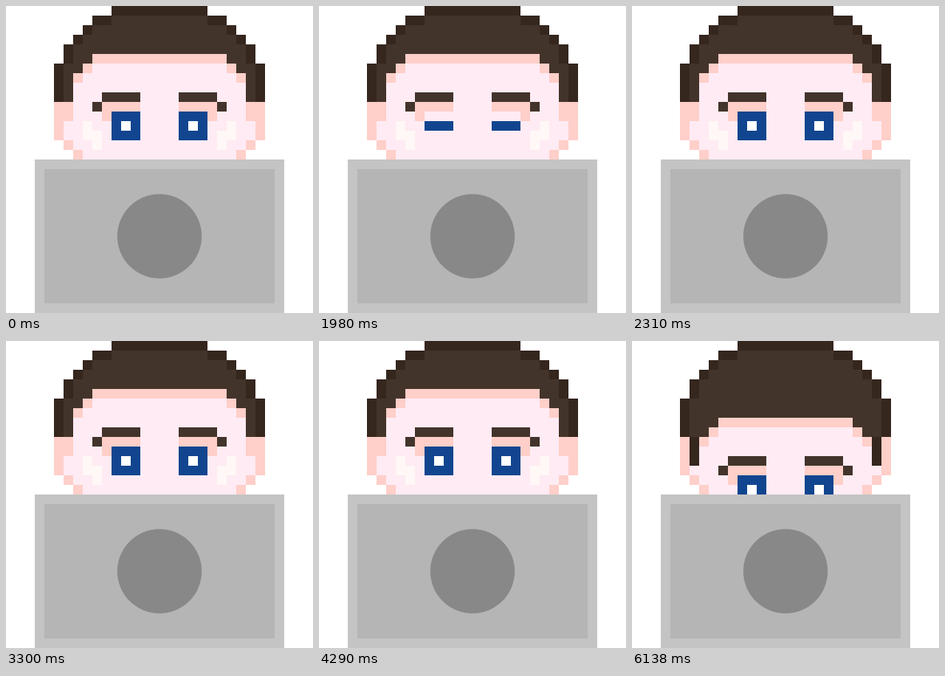
An HTML page that plays this animation: 384x384 px, repeating every 6930 ms.

```html
<!DOCTYPE html>
<html lang="en">
<head>
<meta charset="utf-8">
<title>Peeking over a laptop</title>
<style>
  html, body { margin: 0; width: 100%; height: 100%; overflow: hidden; background: #fff; }
  svg { display: block; width: 100vw; height: 100vh; }
  .mirror { transform: translateX(32px) scaleX(-1); }
  .outline { fill: #35261e; }
  .hair { fill: #43342b; }
  .skin { fill: #ffebf4; }
  .blush { fill: #ffcfc9; }
  .shine { fill: #fff8f6; }
  .iris { fill: #12458f; }

  /* one loop: look, blink twice, duck */
  .head, .open, .up, .down { animation: 6930ms step-end infinite; }
  .head { animation-name: duck; }
  .open { animation-name: blink; }
  .up { animation-name: up; }
  .down { animation-name: down; }
  @keyframes duck {
    0% { transform: none; }
    71.4286%, 100% { transform: translateY(3px); }
  }
  @keyframes blink {
    0%, 33.3333%, 47.619%, 100% { opacity: 1; }
    28.5714%, 42.8571% { opacity: 0; }
  }
  @keyframes up {
    0% { opacity: 1; }
    71.4286%, 100% { opacity: 0; }
  }
  @keyframes down {
    0% { opacity: 0; }
    71.4286%, 100% { opacity: 1; }
  }
</style>
</head>
<body>
<svg viewBox="0 0 32 32" shape-rendering="crispEdges">
  <defs>
    <!-- left halves on a 32-cell grid, mirrored for the right side -->
    <g id="hair">
      <path class="outline" d="M16 0H11V1H9V2H8V3H7V4H6V6H5V10H16z"/>
      <path class="hair" d="M16 1H11V2H9V3H8V4H7V6H6V10H16z"/>
    </g>
    <g id="face">
      <path class="blush" d="M16 5H9V6H8V7H7V9H16z"/>
      <path class="skin" d="M16 6H9V7H8V8H7V16H16z"/>
      <path class="hair" d="M10 9h4v1h-4zM9 10h1v1H9z"/>
      <path class="blush" d="M10 10h4v1h-3v1h-1z"/>
      <path class="iris" d="M11 12h3v1h-3z"/>
    </g>
    <g id="eye">
      <path class="iris" d="M11 11h3v3h-3z"/>
      <path fill="#fff" d="M12 12h1v1h-1z"/>
    </g>
    <path id="shine" class="shine" d="M8 12h1v1h1v2H9v-1H8z"/>
    <g id="side">
      <path class="skin" d="M6 12h1v2H6z"/>
      <path class="blush" d="M5 10h2v2H6v2H5zM6 14h1v1H6zM7 15h1v1H7z"/>
    </g>
    <path id="burn" class="outline" d="M6 10h1v3H6z"/>
  </defs>

  <use href="#hair"/><use href="#hair" class="mirror"/>
  <g class="head">
    <use href="#face"/><use href="#face" class="mirror"/>
    <g class="open"><use href="#eye"/><use href="#eye" class="mirror"/></g>
  </g>
  <g class="up"><use href="#shine"/><use href="#shine" class="mirror"/></g>
  <use href="#side"/><use href="#side" class="mirror"/>
  <g class="down"><use href="#burn"/><use href="#burn" class="mirror"/></g>

  <path fill="#c4c4c4" d="M3 16h26v16H3z"/>
  <path fill="#b5b5b5" d="M4 17h24v14H4z"/>
  <circle cx="16" cy="24" r="4.4" fill="#888" shape-rendering="auto"/>
</svg>
</body>
</html>
```
